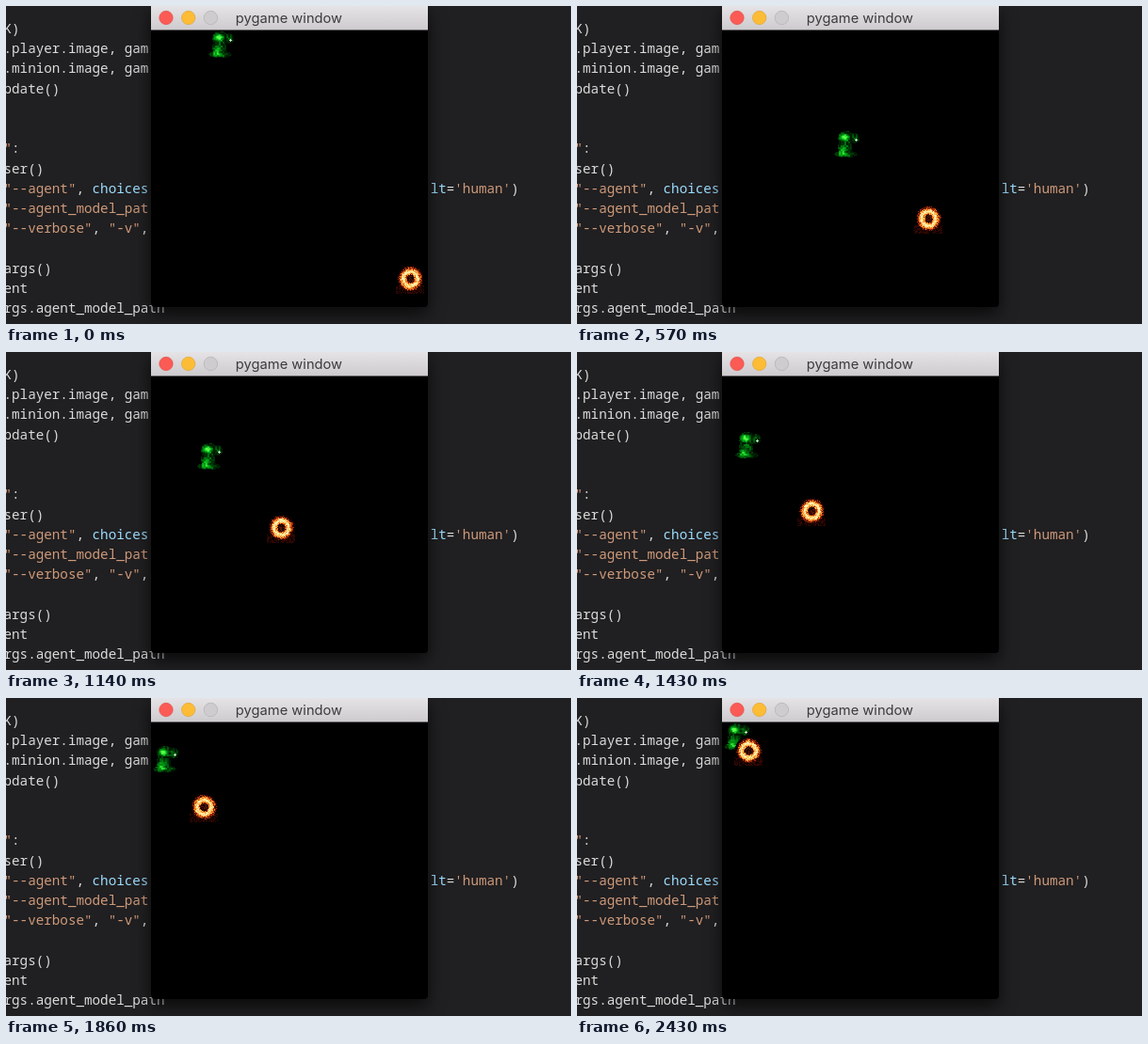
An HTML page with a canvas for the animation above (2.57 s loop, 600 by 338 pixels).

```html
<!DOCTYPE html>
<html lang="en">
<head>
<meta charset="utf-8">
<title>pygame window</title>
<style>
html, body { margin: 0; width: 100%; height: 100%; overflow: hidden; background: #201f21; }
svg, canvas { position: absolute; left: 0; top: 0; }
.code { font: 14.25px "Noto Sans Mono", "DejaVu Sans Mono", monospace; fill: #dcdcdc; white-space: pre; font-variant-ligatures: none; }
.str { fill: #ce9a7a; }
.arg { fill: #9cdcfe; }
.title { font: 14.7px Inter, "Open Sans", sans-serif; fill: #3d3b3d; text-anchor: middle; }
.window { filter: drop-shadow(0 7px 9px #000a); }
</style>
</head>
<body>
<svg width="600" height="338" viewBox="0 0 600 338">
  <defs>
    <linearGradient id="bar" x2="0" y2="1">
      <stop stop-color="#e5e3e5"/><stop offset="1" stop-color="#cecbce"/>
    </linearGradient>
  </defs>
  <rect width="600" height="338" fill="#201f21"/>
  <g class="code" id="code"></g>
  <g class="window">
    <path d="M154 0H448V316q0 4-4 4H158q-4 0-4-4Z"/>
    <rect x="154" width="294" height="25.5" fill="url(#bar)"/>
  </g>
  <circle cx="170" cy="12.5" r="7.2" fill="#fc5b55" stroke="#de4640" stroke-width=".6"/>
  <circle cx="193.7" cy="12.5" r="7.2" fill="#fdbc35" stroke="#dea02a" stroke-width=".6"/>
  <circle cx="217.4" cy="12.5" r="7.2" fill="#cfcccf" stroke="#b6b3b6" stroke-width=".8"/>
  <text class="title" x="300.5" y="18">pygame window</text>
</svg>
<canvas id="stage" width="600" height="338"></canvas>
<script>
// Line number, column, text, class
const lines = [
  [0, 0, 'K)'], [1, 0, '.player.image, gam'], [2, 0, '.minion.image, gam'], [3, 0, 'pdate()'],
  [6, 0, '"', 'str'], [6, 1, ':'], [7, 0, 'ser()'],
  [8, 0, '"--agent"', 'str'], [8, 9, ','], [8, 11, 'choices', 'arg'],
  [8, 53, 'lt', 'arg'], [8, 55, '='], [8, 56, "'human'", 'str'], [8, 63, ')'],
  [9, 0, '"--agent_model_pat', 'str'],
  [10, 0, '"--verbose"', 'str'], [10, 11, ','], [10, 13, '"-v"', 'str'], [10, 17, ','],
  [12, 0, 'args()'], [13, 0, 'ent'], [14, 0, 'rgs.agent_model_path']
];
for (const [row, col, text, cls] of lines) {
  const el = document.createElementNS('http://www.w3.org/2000/svg', 'text');
  el.setAttribute('x', col * 8.55 - 2.5);
  el.setAttribute('y', 28.8 + row * 21.25);
  if (cls) el.setAttribute('class', cls);
  el.textContent = text;
  document.getElementById('code').append(el);
}

const LOOP = 2570, STEP = 142.8;
const player = [
  [228, 40], [310, 170], [310, 158], [298, 158], [286, 146], [275, 134],
  [251, 122], [228, 122], [216, 110], [192, 110], [181, 98], [169, 87],
  [169, 75], [169, 64], [169, 52], [169, 40], [169, 40], [169, 40]
];
const minion = [
  [429, 291], [424, 264], [418, 241], [395, 234], [373, 227], [350, 220],
  [327, 212], [310, 204], [292, 188], [264, 184], [249, 170], [236, 153],
  [222, 135], [210, 117], [204, 94], [197, 71], [182, 57], [182, 57]
];

const ctx = document.getElementById('stage').getContext('2d');

function noise(x, y, seed) {
  const v = Math.sin(x * 127.1 + y * 311.7 + seed * 74.7) * 43758.5;
  return v - Math.floor(v);
}

// Paints a 30px sprite; shade(x, y) returns a colour or nothing.
function sprite([cx, cy], shade) {
  for (let y = -15; y < 15; y++) {
    for (let x = -15; x < 15; x++) {
      const color = shade(x, y);
      if (!color) continue;
      ctx.fillStyle = color;
      ctx.fillRect(cx + x, cy + y, 1, 1);
    }
  }
}

const oval = (x, y, cx, cy, rx, ry) => 1 - Math.hypot((x - cx) / rx, (y - cy) / ry);

function slime(seed) {
  return (x, y) => {
    const depth = Math.max(
      oval(x, y, -1, -6, 9, 8), oval(x, y, 8, -6, 6, 6),
      oval(x, y, -2, 4, 8, 10), oval(x, y, -1, 11, 13, 4)
    );
    if (depth < 0.05) return;
    if (Math.hypot(x - 10, y + 4) < 1.3) return '#b8e8bc';
    const glow = Math.max(oval(x, y, -3, -7, 6, 5), 0.7 * oval(x, y, -5, 9, 6, 6), 0);
    const light = 0.1 + depth * 0.35 + glow * 0.75 + (noise(x >> 1, y >> 1, seed) - 0.5) * 0.35 - (x > 3 ? 0.08 : 0);
    const g = Math.max(25, Math.min(255, light * 270));
    const tint = Math.max(0, g - 170);
    return `rgb(${tint},${g},${g * 0.12 + tint * 0.5})`;
  };
}

function fireRing(seed) {
  return (x, y) => {
    const r = Math.hypot(x, y + 1.5), n = noise(x, y, seed);
    const hole = oval(x, y + 1.5, 0, 0, 3.6 + seed % 2, 4.6);
    if (hole > 0) return n > 0.6 ? '#5a1606' : '#1c0502';
    const heat = 1.15 - Math.abs(r - 7.6) / 5 - n * 0.5;
    if (heat > 0.72) return '#fff0ae';
    if (heat > 0.5) return '#ffc45a';
    if (heat > 0.27) return '#f07a24';
    if (heat > 0) return '#9c2a0c';
    if (r < 13) return '#330a03';
    if (y > 5 && n > 0.45) return '#300703';
    return r < 15 ? '#0b0201' : undefined;
  };
}

function draw() {
  const t = performance.now() % LOOP;
  const i = Math.min(17, Math.floor((t + 5) / STEP));
  ctx.clearRect(0, 0, 600, 338);
  sprite(player[i], slime(i % 4));
  sprite(minion[i], fireRing(i));
  requestAnimationFrame(draw);
}
draw();
</script>
</body>
</html>
```
